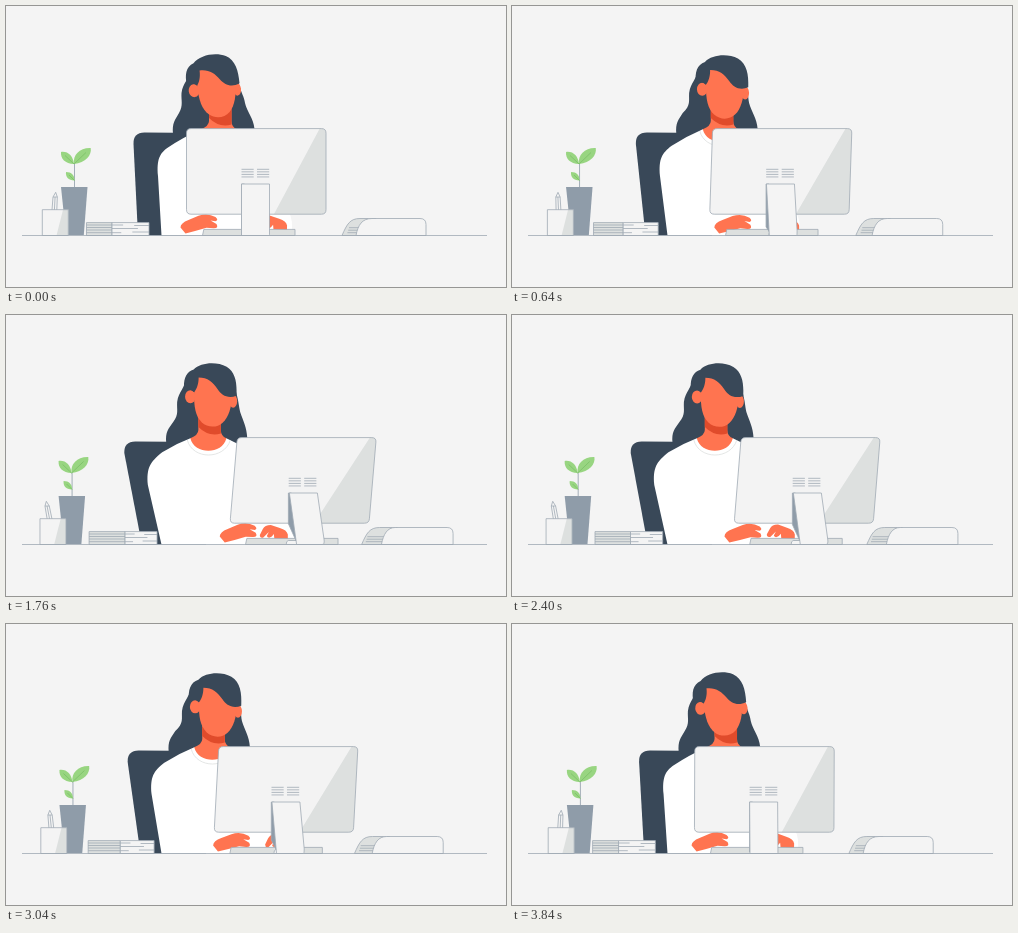
These frames come from a looping animation (500x281 px, 4000 ms). An HTML page:

```html
<!DOCTYPE html>
<html lang="en">
<head>
<meta charset="utf-8">
<title>Desk scene</title>
<style>
  html, body { margin: 0; width: 100%; height: 100%; overflow: hidden; background: #f4f4f4; }
  svg { display: block; width: 100%; height: 100%; }
</style>
</head>
<body>
<svg id="stage" viewBox="0 0 500 281"></svg>
<script>
const LOOP = 4000, STEP = 80, LAST = 3840, DESK = 229.5;
const NAVY = '#394858', SKIN = '#ff7450', SHADE = '#e04b2b', LINE = '#a0aab4',
      GREY = '#dde0df', SLATE = '#8f9ca9', LEAF = '#98d581', VEIN = '#7cbf68',
      PALE = '#f4f4f4', WHITE = '#fff';

const stage = document.getElementById('stage');
const parts = [];
let p = 0;      // camera shift, 0 = left view, 1 = right view
let time = 0;

const mix = (a, b) => +(a + (b - a) * p).toFixed(2);

function node(tag, attrs, parent = stage) {
  const el = document.createElementNS('http://www.w3.org/2000/svg', tag);
  for (const k in attrs) el.setAttribute(k, attrs[k]);
  return parent.appendChild(el);
}

// A path whose outline is rebuilt from p; fixed when given a string.
function shape(d, fill, stroke, parent) {
  const el = node('path', {
    fill: fill || 'none', stroke: stroke || 'none',
    'stroke-width': .8, 'stroke-linejoin': 'round'
  }, parent);
  if (typeof d === 'string') el.setAttribute('d', d);
  else parts.push(() => el.setAttribute('d', d()));
  return el;
}

// A group whose transform is rebuilt from p and time.
function group(transform) {
  const g = node('g', {});
  parts.push(() => g.setAttribute('transform', transform()));
  return g;
}

function rounded(pts, r) {
  const n = pts.length;
  const toward = (a, b) => {
    const k = r / Math.hypot(b[0] - a[0], b[1] - a[1]);
    return [a[0] + (b[0] - a[0]) * k, a[1] + (b[1] - a[1]) * k];
  };
  return pts.map((c, i) =>
    `${i ? 'L' : 'M'}${toward(c, pts[(i + n - 1) % n])}Q${c} ${toward(c, pts[(i + 1) % n])}`
  ).join('') + 'Z';
}

const headX = () => 5 * (1 - p) + 15 * p * (1 - p);
const headY = () => 5.5 * p * (1 - p);
const headMove = () =>
  `translate(${headX()} ${headY()}) rotate(${-8 * (1 - p) ** 4} 206 88)`;
const bodyMove = () => `translate(${11 * (1 - p)} 0)`;

// Chair
shape(() => {
  const x = mix(127.5, 118);
  return `M${mix(132, 136)} ${DESK}L${x} 138Q${x - .5} 126.800 ${x + 11} 126.600L200 127V${DESK}Z`;
}, NAVY);

// Long hair
shape(() => {
  const h = headX();
  return `M${180 + h} 62C${178 + h} 74 ${172 + h} 76 ${170.5 + h} 87
    C${170 + h} 95 ${172.5 + h} 99 ${mix(173, 167)} 107
    C${mix(169, 162)} 114 ${mix(166, 159)} 117 ${mix(167, 160)} 128
    L${mix(182, 175)} 140H${mix(246, 239)}L${mix(248.5, 241)} 123
    C${mix(247.5, 240.5)} 112 ${mix(241, 237)} 106 ${mix(239, 234)} 97
    C${mix(238, 232.5)} 90 ${232.500 + h * .6} 88 ${230 + h * .6} 78L${224 + h} 62Z`;
}, NAVY);

// Shirt
shape(() => {
  const e = mix(152, 141.5), l = mix(195, 184), r = mix(231, 220);
  return `M155.5 ${DESK}L${e} 170C${e - 1.5} 153 ${e + 2} 147 ${mix(162, 156)} ${mix(141.5, 137)}
    Q${mix(177, 170)} ${mix(131.5, 128.5)} ${l} 123.300H${r}L${r + 30} 138L278 200
    Q${mix(287, 291)} 208 ${mix(286, 290)} 223V${DESK}Z`;
}, WHITE);

// Neck and collar
const neck = group(bodyMove);
shape('M192 98V115Q192 120 184 123.3C188 140 216 140 220 123.3Q214.500 121 214.500 115V98Z', SKIN, '', neck);
shape('M192 103V112Q202 122 214.500 118.500V101Z', SHADE, '', neck);
shape('M181 125C186 145 218 145 224 125', '', GREY, neck);

// Head
const head = group(headMove);
node('ellipse', { cx: 183.7, cy: 81.5, rx: 5.3, ry: 6.5, fill: SKIN }, head);
node('ellipse', { cx: 226.5, cy: 86, rx: 4, ry: 6.5, fill: SKIN }, head);
shape('M190 60L187.500 76C187 92 189 101 195 107C201 112.500 210 113 216 107.500C222 102 225 92 226 78L216 60Z', SKIN, '', head);
shape(`M177.500 76C176.500 64 179 57 187 54.300C194 47 210 46 220 51.500
  C229 57 230.500 68 229.800 80.500C221 84 214.500 79.500 211 74
  C206.500 67 201 62.300 192 62.300C192 69 190 74 187.500 77Q183 72 177.500 76Z`, NAVY, '', head);

// Plant
const plant = group(() => `translate(${-2.5 * p} 0)`);
shape('M68.500 181V157', '', SLATE, plant);
shape('M68 158C66.500 149 74 141.500 84.700 142C86 149 79.500 157 68 158Z', LEAF, '', plant);
shape('M68 158C59 157.500 54.500 153 55 146C62 145 67 150 68 158Z', LEAF, '', plant);
shape('M68.500 174.500C62 174 59.500 171 60 166C65.500 166 68.500 169 68.500 174.500Z', LEAF, '', plant);
shape('M68 158L80 146.500M68 158L59 149.500M68.500 174.500L63 169', '', VEIN, plant);
shape('M55 181H81.500L77.800 229H60Z', SLATE, '', plant);

// Pencil and its box
shape(() => {
  const b = mix(46, 41), t = mix(47, 38.7);
  return `M${b} 204L${t} 191L${mix(49.7, 40)} 186.300L${t + 4.3} 191L${b + 4.8} 204
    M${t} 191H${t + 4.3}M${b + 2.4} 204L${t + 2.1} 191`;
}, PALE, LINE);
const box = group(() => `translate(${-2.4 * p} 0)`);
shape(`M36.300 203.700H62.300V${DESK}H36.300Z`, PALE, '', box);
shape(`M57 203.700H62.300V${DESK}H50.500Z`, GREY, '', box);
shape(`M36.300 203.700H62.300V${DESK}H36.300Z`, '', LINE, box);

// Books
const bookL = () => mix(80.5, 83.2), bookM = () => mix(106, 119.5), bookR = () => mix(143, 151.3);
shape(() => `M${bookL()} 216.600H${bookM()}V${DESK}H${bookL()}Z`, GREY, LINE);
shape(() => `M${bookM()} 216.600H${bookR()}V${DESK}H${bookM()}Z`, PALE, LINE);
shape(() => [219, 221.5, 224, 226.7].map(y => `M${bookL()} ${y}H${bookM()}`).join(''), '', LINE);
shape(() => {
  const m = bookM(), r = bookR(), w = r - m;
  return `M${m} 219H${m + w * .3}M${r - w * .4} 219.500H${r}M${m} 222.500H${r - w * .3}
    M${m + w * .55} 226H${r}M${m} 226.700H${m + w * .25}`;
}, '', LINE);

// Hands
const tap = (rate, phase) => 1.5 * Math.sin(time / STEP * rate + phase);
const leftHand = group(() => {
  const x = 174.5 + 40.5 * p + 84 * p * (1 - p) ** 2;
  return `translate(${x} 0) rotate(${tap(1.7, 0)} 4 224)`;
});
shape(`M0 221.500Q0 217 8 214L18 209.800Q27 206.500 35 211Q38.500 214 35 215.300L30 214.500
  L36 218Q38.500 222.500 33 222.300L26 221.800Q17 224.500 5 227.500Z`, SKIN, '', leftHand);
const rightHand = group(() =>
  `translate(${253 + 26 * p * (1 - p)} 0) rotate(${tap(2.1, 1)} 28 222)`);
shape(`M28 224V219.500Q27 215 20 213L11 210Q5 210 3 214L0 220Q0 223.500 3.500 222.500L9 217
  L7 221Q8.500 224 12 221.500L14 219L14.500 223.500Z`, SKIN, '', rightHand);

// Keyboard
shape(() => {
  const x = mix(197, 241.5);
  return `M${x + .8} 223.400H${x + 92}V${DESK}H${x - .5}Z`;
}, GREY, LINE);

// Monitor
const screen = () => rounded([
  [mix(180.5, 233), 122.6], [mix(320, 372), 122.6],
  [mix(320, 364.5), 208.2], [mix(180.5, 225.5), 208.2]
], 4.5);
const clip = node('clipPath', { id: 'screen' });
shape(screen, '#000', '', clip);
shape(screen, '#f3f3f3');
shape(() => `M${mix(314, 366)} 122L${mix(267.5, 309)} 209H390V122Z`, GREY)
  .setAttribute('clip-path', 'url(#screen)');
shape(screen, '', LINE);
shape(() => {
  const x = mix(235.5, 284.3);
  return [0, 1, 2, 3].map(i => `M${x} ${163.3 + i * 2.55}h12.200m3.300 0h12.200`).join('');
}, '', LINE);

// Stand
shape(() => {
  const x = mix(236, 292), w = 11 * p ** 3;
  return `M${x + 2} 225.500H${x - w + 2}Q${x - w} 226 ${x - w} ${DESK}H${x + 2}Z`;
}, PALE, LINE);
shape(() => {
  const x = mix(235.5, 284);
  return `M${x + 3} 178H${x}V${mix(229, 208)}L${mix(236, 292)} 226Z`;
}, SLATE, LINE);
shape(() => `M${mix(235.5, 285)} 178H${mix(263.5, 313)}L${mix(263.5, 320)} 225
  Q${mix(263.5, 320.5)} ${DESK} ${mix(263.5, 318)} ${DESK}H${mix(235.5, 292.5)}Z`, PALE, LINE);

// Desk tray
shape(() => {
  const x = mix(336, 356.3);
  return `M${x} ${DESK}C${x + 5} 218 ${x + 8} 212.500 ${x + 18} 212.500H${mix(370, 392)}V${DESK}Z`;
}, GREY, LINE);
shape(() => [221.7, 224.2, 226.7].map((y, i) =>
  `M${mix(343, 362) - i * .8} ${y}H${mix(356, 380)}`).join(''), '', LINE);
shape(() => {
  const x = mix(350, 376.3), r = mix(420, 448);
  return `M${x} ${DESK}C${x + 2} 219 ${x + 6} 212.500 ${mix(366, 390)} 212.500
    H${r - 6}Q${r} 212.500 ${r} 218.500V${DESK}Z`;
}, PALE, LINE);

// Desk
shape(`M16 ${DESK}H481`, '', LINE);

// Cubic Bezier easing, solved by bisection
function ease(u) {
  const curve = (s, a, b) => 3 * s * (1 - s) ** 2 * a + 3 * s * s * (1 - s) * b + s ** 3;
  let lo = 0, hi = 1;
  for (let i = 0; i < 24; i++) {
    const s = (lo + hi) / 2;
    if (curve(s, .19, .49) < u) lo = s; else hi = s;
  }
  return curve(lo, 0, .93);
}

function draw(now) {
  time = Math.min(Math.floor(now % LOOP / STEP) * STEP, LAST);
  p = ease(1 - Math.abs(time / 2000 - 1));
  parts.forEach(update => update());
}

const start = performance.now();
function tick() {
  draw(performance.now() - start);
  requestAnimationFrame(tick);
}
tick();
</script>
</body>
</html>
```
